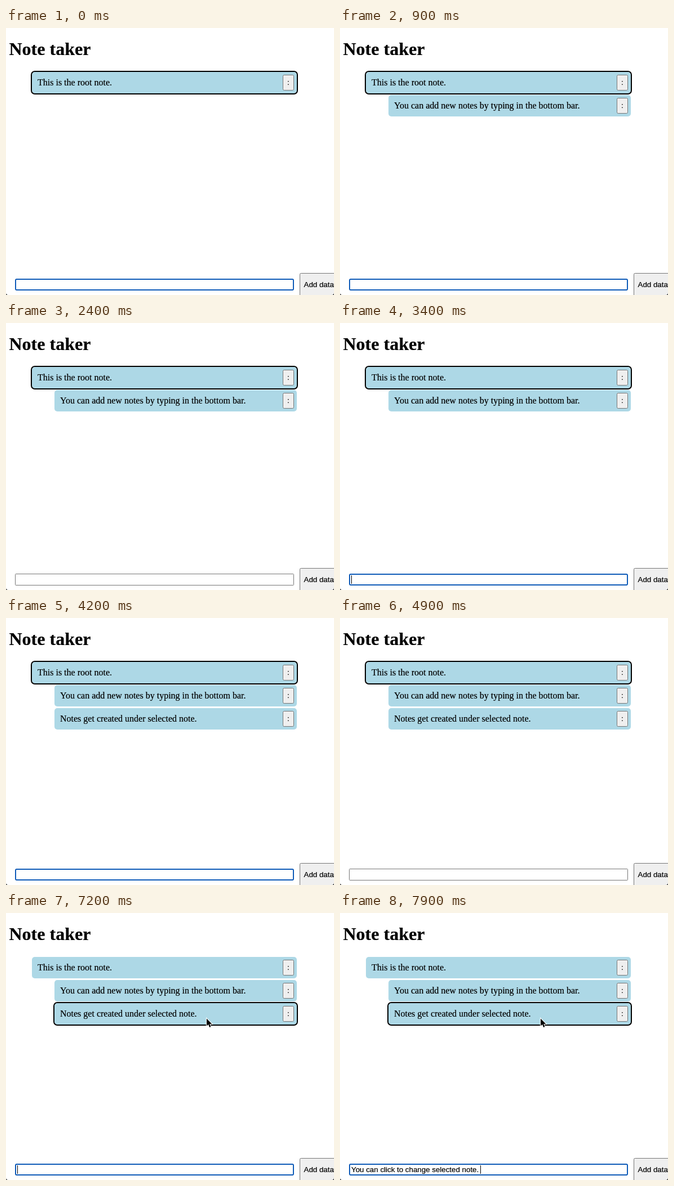
An HTML page that plays this animation: 582 by 474 pixels, repeating every 8 s.

```html
<!DOCTYPE html>
<html lang="en">
<head>
<meta charset="utf-8">
<title>Note taker</title>
<style>
  html, body { margin: 0; width: 100%; height: 100%; overflow: hidden; background: #fff; }
  svg { display: block; width: 582px; height: 474px; }
  text { font: 16px "Liberation Serif", Times, serif; stroke: #000; stroke-width: .2px; }
  .title { font-size: 32px; font-weight: bold; }
  .ui { font: 13.333px "Liberation Sans", Arial, sans-serif; white-space: pre; }
  .button { fill: #efefef; stroke: #767676; }
  .ring { fill: none; stroke: #000; stroke-width: 2; }
  #mouse { stroke: #fff; stroke-width: 2; paint-order: stroke; }
</style>
</head>
<body>
<svg viewBox="0 0 582 474">
  <text class="title" x="5.5" y="48">Note taker</text>
  <g id="notes"></g>
  <rect id="field" fill="#fff"/>
  <text id="typed" class="ui" x="20" y="460"></text>
  <rect id="caret" y="448" width="1" height="15"/>
  <rect class="button" x="521.5" y="435.5" width="70" height="45" rx="2"/>
  <text class="ui" x="528.5" y="460">Add data</text>
  <path d="M0 470Q0 474 4 474H0ZM582 470Q582 474 578 474H582Z" fill="#222"/>
  <path id="mouse" d="M0 0V13L3 10.3L5.2 15.4L7.4 14.4L5.3 9.5H9.4Z"/>
</svg>
<script>
const LOOP = 8000;
const $ = id => document.getElementById(id);
const within = (t, ...spans) => spans.some(([a, b]) => t >= a && t < b);
const set = (el, attrs) => Object.entries(attrs).forEach(([k, v]) => el.setAttribute(k, v));
const show = (el, on) => set(el, { visibility: on ? "visible" : "hidden" });

const notes = [
  { x: 46, y: 78, from: 0, selected: [0, 7200], text: "This is the root note." },
  { x: 86, y: 119, from: 100, selected: [0, 0], text: "You can add new notes by typing in the bottom bar." },
  { x: 86, y: 160, from: 4200, selected: [7200, LOOP], text: "Notes get created under selected note." }
];

$("notes").innerHTML = notes.map(({ x, y, text }) => `<g>
  <rect x="${x}" y="${y}" width="${516 - x}" height="38" rx="5" fill="#add8e6"/>
  <rect class="ring" x="${x - 1}" y="${y - 1}" width="${518 - x}" height="40" rx="6"/>
  <text x="${x + 10}" y="${y + 24}">${text}</text>
  <rect class="button" x="491.5" y="${y + 5.5}" width="19" height="27" rx="2"/>
  <text class="ui" x="499" y="${y + 23}">:</text>
</g>`).join("");
notes.forEach((note, i) => {
  note.el = $("notes").children[i];
  note.ring = note.el.querySelector(".ring");
});

function typedAt(t) {
  if (within(t, [3700, 4100])) return notes[2].text + " ";
  if (t >= 7900) return "You can click to change selected note. ";
  return "";
}

function drawField(t) {
  const focused = !within(t, [1900, 3400], [4800, 6300]);
  const line = focused ? 2 : 1;
  set($("field"), {
    x: 16 + line / 2, y: 445 + line / 2,
    width: 495 - line, height: 21 - line,
    rx: focused ? 2 : 1,
    stroke: focused ? "#0f5bb8" : "#767676",
    "stroke-width": line
  });
  const text = typedAt(t);
  if ($("typed").textContent !== text) $("typed").textContent = text;
  const width = text ? $("typed").getComputedTextLength() : 0;
  set($("caret"), { x: Math.floor(20 + width - (text ? 0.5 : 0)) });
  show($("caret"), within(t, [400, 800], [1200, 1700], [3400, 4100],
    [4400, 4800], [6300, 6800], [7200, 7700], [7900, LOOP]));
}

function drawMouse(t) {
  const p = Math.min(1, Math.max(0, (t - 6700) / 500));
  const rest = (1 - p) ** 2;
  set($("mouse"), { transform: `translate(${356 + 90 * rest} ${187.5 + 282 * rest})` });
  show($("mouse"), t >= 6700);
}

function draw(now) {
  const t = now % LOOP;
  for (const note of notes) {
    set(note.el, { display: t >= note.from ? "inline" : "none" });
    show(note.ring, within(t, note.selected));
  }
  drawField(t);
  drawMouse(t);
}

const start = performance.now();
function frame() {
  draw(performance.now() - start);
  requestAnimationFrame(frame);
}
frame();
</script>
</body>
</html>
```
